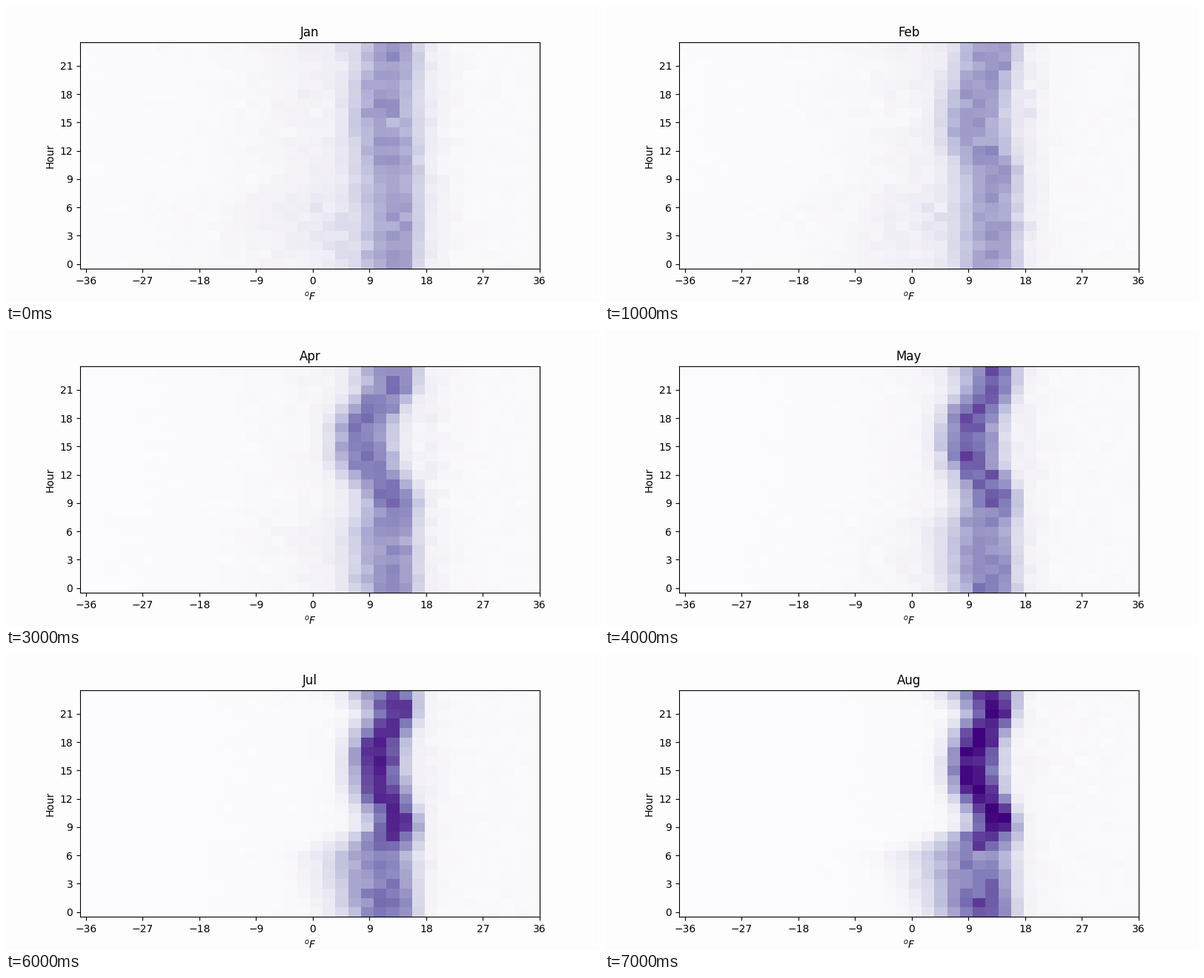
Recreate the animation shown at these times as a matplotlib script. Size 800 by 400 pixels, loop 8 s.

```python
import numpy as np
import matplotlib.pyplot as plt
from matplotlib.animation import FuncAnimation

ROWS, COLS = 24, 36
MONTHS = ["Jan", "Feb", "Mar", "Apr", "May", "Jun", "Jul", "Aug"]
hour = np.arange(ROWS)[:, None]
col = np.arange(COLS)

# Daily cycle: the band is widest before dawn and swings left in the afternoon.
night = np.interp(hour, [0, 6, 9.2, 21, 24], [.6, 1, 0, 0, .5])
swing = np.exp(-np.abs((hour - 15.7) / 4.5) ** 3)


def mix(a, b, t):
    return a + (b - a) * t


def heat(month):
    rng = np.random.default_rng(month + 5)
    season = month / (len(MONTHS) - 1)
    reach = np.interp(month, [0, 3, 5, 7], [.2, 2.1, 1.1, 1.6])

    # Half-height edges, mode and height of the band for each hour
    left = 21.1 + 1.7 * season - (reach + .3) * swing - 4 * season ** 1.5 * night
    right = 26.2 - .2 * season - reach * swing - .5 * season * night
    mode = mix(left, right, .6 - .17 * swing)
    peak = mix(.5 + .5 * season ** 1.5, .48 + .1 * season, night)

    offset = col - mode
    cool = np.abs(offset / (mode - left)) ** 2
    hot = np.abs(offset / (right - mode)) ** 2.6
    band = peak * .5 ** np.where(offset < 0, cool, hot)
    band = band * (1 + .07 * rng.standard_normal((ROWS, COLS)))

    # Faint tails on both sides
    tail = .2 * (1 - .8 * season)
    cold = tail * (.7 + .5 * night) * np.exp(np.minimum(col - 21, 0) / (3 + 15 * tail))
    warm = .02 + (.02 + .4 * tail) * np.exp(-np.maximum(col - 27, 0) / 1.2)
    edge = np.where(col < 24, cold, warm)
    edge = edge * (1 + .2 * rng.standard_normal((ROWS, COLS)))
    return np.clip(np.maximum(band, edge), 0, 1)


grids = [heat(m) for m in range(len(MONTHS))]

plt.rcParams["font.family"] = "DejaVu Sans"
fig, ax = plt.subplots(figsize=(8, 4), dpi=100, facecolor="#fdfdfd")
image = ax.imshow(grids[0], cmap="Purples", vmin=0, vmax=1, origin="lower",
                  aspect=.74, interpolation="nearest")
title = ax.set_title(MONTHS[0])
ax.set_xticks(np.linspace(-.04, COLS - .5, 9),
              [str(t).replace("-", "\u2212") for t in range(-36, 37, 9)])
ax.set_xlim(-.5, COLS - .5)
ax.set_yticks(range(0, ROWS, 3))
ax.set_xlabel("$^oF$")
ax.set_ylabel("Hour")


def update(i):
    image.set_data(grids[i])
    title.set_text(MONTHS[i])
    return image, title


anim = FuncAnimation(fig, update, frames=len(MONTHS), interval=1000, repeat=True)
plt.show()
```
